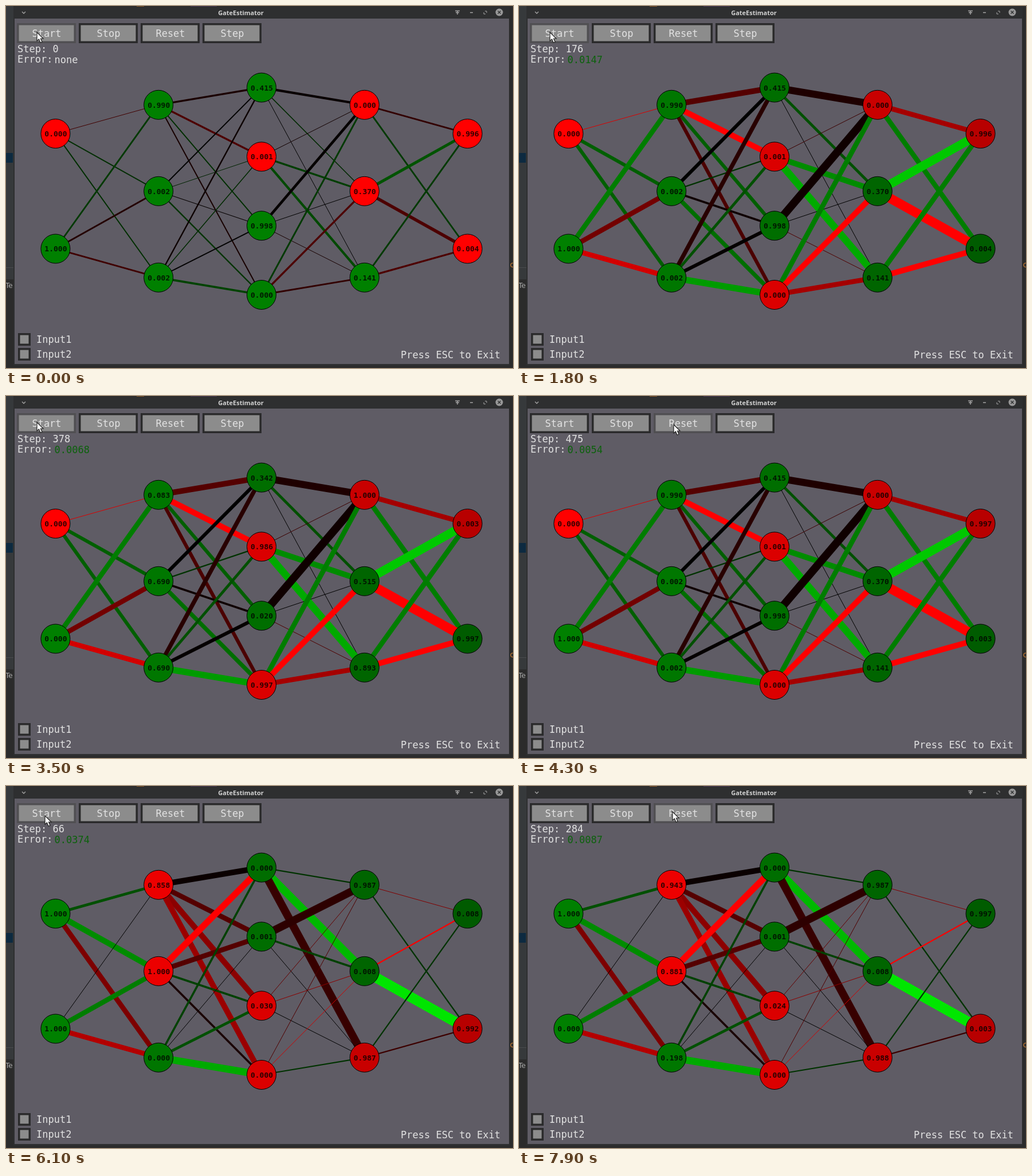
Recreate the animation shown at these times as an HTML page with a canvas. Size 885 by 633 pixels, loop 8000 ms.

```html
<!DOCTYPE html>
<html lang="en">
<head>
<meta charset="utf-8">
<title>GateEstimator</title>
<style>
html, body { margin: 0; width: 100%; height: 100%; overflow: hidden; background: #2b2b2b; }
canvas { display: block; }
</style>
</head>
<body>
<canvas id="stage" width="885" height="633"></canvas>
<script>
const ctx = document.getElementById('stage').getContext('2d');
const LOOP = 8000;
const MONO = '"DejaVu Sans Mono", monospace';
const WHITE = '#e2e2e2', FRAME = '#2a2a2b', FACE = '#8c8c8c', ICON = '#a6a6a6';
const THIN = [1, 0];

// Trained weights, one row per source node. A plain number is a positive weight;
// a pair is a negative weight with its redness. Everything else follows from these.
const runs = [
  {
    errorSum: 2.5786,
    redAtStart: [0, 6, 9, 10, 12, 13],
    redAtEnd: [0, 6, 8, 9, 12],
    weights: [
      [[[1, 220], 5, 5], [7, [7, 115], [7, 210]]],
      [[[8, 85], [8, 255], 5, [5, 75]], [[5, 0], 2, [3, 15], 6], [[6, 40], 4, [5, 5], 9]],
      [[[10, 30], 4, THIN], [[1, 60], 8, 10], [[11, 15], THIN, [1, 80]], [7, [8, 255], [7, 165]]],
      [[[7, 165], 7], [12, [13, 255]], [7, [8, 255]]]
    ]
  },
  {
    errorSum: 2.47,
    redAtStart: [4, 5, 6, 7, 8, 12, 13],
    redAtEnd: [2, 3, 7, 8, 11, 13],
    weights: [
      [[4, 8, [7, 125]], [THIN, 7, [7, 180]]],
      [[[8, 10], [7, 85], [8, 140], [8, 155]], [[9, 255], [7, 85], 3, [3, 25]], [3, THIN, 4, 10]],
      [[2, 11, [11, 55]], [[11, 45], 3, THIN], [[1, 100], [1, 140], THIN], [[1, 80], [1, 210], 2]],
      [[[1, 130], 2], [[2, 250], 14], [2, [2, 60]]]
    ]
  }
];

// The screen refreshes every 100 ms inside these spans and holds between them.
const refreshes = [[500, 2400], [3500, 3900], [4300, 4300], [4500, 4500], [5300, 5300],
  [5500, 5600], [5800, 5900], [6100, 6400], [6600, 6700], [6900, 7100], [7400, 7700], [7900, 7900]];
const stepKeys = [[305, 0], [1000, 82], [1800, 176], [3500, 378], [4300, 475],
  [4499, 475], [4500, 0], [5550, 0], [6100, 66], [7900, 284]];
const cursorKeys = [[3500, 54, 46], [3900, 190, 50], [4300, 270, 50], [5200, 270, 50],
  [5300, 74, 56], [5600, 68, 52], [6100, 68, 52], [6700, 262, 48], [7700, 268, 45]];
const sampleOrder = [0, 1, 3, 3, 2, 2, 1];

const layers = [2, 3, 4, 3, 2].map((size, depth) => Array.from({ length: size },
  (_, i) => ({ x: 446 + (depth - 2) * 179.8, y: 21.8 + 604 * (i + 1) / (size + 1), depth })));

const lerp = (a, b, p) => a + (b - a) * p;
const sigmoid = v => 1 / (1 + Math.exp(-v));
const signedWeight = w => Array.isArray(w) ? -w[0] : w;

function track(keys, t) {
  const next = keys.findIndex(key => key[0] > t);
  if (next === 0) return keys[0].slice(1);
  if (next < 0) return keys[keys.length - 1].slice(1);
  const a = keys[next - 1], b = keys[next];
  const p = (t - a[0]) / (b[0] - a[0]);
  return a.slice(1).map((v, i) => lerp(v, b[i + 1], p));
}

function refreshTime(t) {
  const tick = Math.floor(t / 100) * 100;
  let shown = 0;
  for (const [start, end] of refreshes) if (tick >= start) shown = Math.min(tick, end);
  return shown;
}

// Feeds one input pair through the network; the outputs are XOR and its inverse.
function activations(run, step) {
  const sample = step ? sampleOrder[step % 7] : 1;
  const inputs = [sample >> 1, sample & 1];
  const result = [inputs];
  run.weights.slice(0, -1).forEach((rows, depth) => {
    const source = result[depth];
    result.push(rows[0].map((_, j) =>
      sigmoid(rows.reduce((sum, row, i) => sum + signedWeight(row[j]) * (source[i] - .4), 0))));
  });
  const miss = step ? Math.min(.1, .4 / step) + .002 : .004;
  const xor = inputs[0] ^ inputs[1];
  result.push([Math.abs(xor - miss), Math.abs(1 - xor - miss)]);
  return result.flat();
}

function shadeColor(shade) {
  const level = Math.min(255, Math.round(Math.abs(shade)));
  return shade < 0 ? `rgb(${level},0,0)` : `rgb(0,${level},0)`;
}

function rect(x, y, w, h, color) {
  ctx.fillStyle = color;
  ctx.fillRect(x, y, w, h);
}

function box(x, y, w, h, border = FRAME) {
  rect(x, y, w, h, border);
  rect(x + 3.5, y + 3.5, w - 7, h - 7, FACE);
}

function text(str, x, y, color = WHITE, font = `17px ${MONO}`, align = 'left') {
  ctx.font = font;
  ctx.fillStyle = color;
  ctx.textAlign = align;
  ctx.fillText(str, x, y);
}

function line(points, width, color) {
  ctx.beginPath();
  points.forEach(([x, y]) => ctx.lineTo(x, y));
  ctx.lineWidth = width;
  ctx.strokeStyle = color;
  ctx.stroke();
}

function disc(x, y, r, color) {
  ctx.beginPath();
  ctx.arc(x, y, r, 0, Math.PI * 2);
  ctx.fillStyle = color;
  ctx.fill();
}

function drawDesktop() {
  rect(0, 0, 885, 633, '#2b2b2b');
  rect(0, 0, 13, 478, '#36393b');
  rect(0, 257, 12, 17, '#0d2a40');
  rect(0, 457, 13, 1, '#4a4c4e');
  text('Te', -1, 493, '#aaa', '12px "DejaVu Sans", sans-serif');
  text('c', 879, 457, '#c07832', `14px ${MONO}`);
  rect(228, 0, 13, 1, '#8a5a2c');
  rect(322, 0, 46, 1, '#4a3a56');
}

function drawWindow() {
  rect(13, 2, 866, 627, '#2e2f30');
  rect(15, 22, 863, 604, '#5f5c65');
  text('GateEstimator', 410, 16, '#d2d2d2', 'bold 11px "Noto Sans", "Open Sans", sans-serif', 'center');
  line([[28, 10], [31, 13], [34, 10]], 1.3, ICON);
  line([[784, 8.5], [792, 8.5]], 1.5, ICON);
  line([[785, 11.5], [791, 11.5]], 1.5, ICON);
  line([[788, 8], [788, 15]], 1.5, ICON);
  line([[810, 11.5], [815, 11.5]], 1.5, ICON);
  line([[836, 9], [839, 9], [839, 12]], 1, ICON);
  line([[834, 11], [834, 14], [837, 14]], 1, ICON);
  disc(861, 11, 6.5, '#989898');
  line([[858.5, 8.5], [863.5, 13.5]], 1.3, '#2e2f30');
  line([[863.5, 8.5], [858.5, 13.5]], 1.3, '#2e2f30');
}

function drawControls([cursorX, cursorY]) {
  ['Start', 'Stop', 'Reset', 'Step'].forEach((label, i) => {
    const x = 19 + i * 108;
    const hover = cursorX >= x && cursorX < x + 103 && cursorY >= 30 && cursorY < 65;
    box(x, 30, 103, 35, hover ? '#504f52' : FRAME);
    text(label, x + 52, 54, WHITE, undefined, 'center');
  });
  ['Input1', 'Input2'].forEach((label, i) => {
    const y = 572 + i * 26;
    box(21, y, 22, 22);
    text(label, 53, y + 16.5);
  });
  text('Press ESC to Exit', 689, 616);
}

function drawStatus(run, step) {
  text('Step: ' + step, 20, 81);
  text('Error:', 20, 99);
  if (!step) return text('none', 84.5, 100);
  const error = run.errorSum / step * (1 - Math.exp(-step / 10));
  text(error.toFixed(4), 84.5, 100, '#0c620c');
}

function drawEdge(from, to, weight, learned) {
  const strength = Math.max(1, Math.abs(signedWeight(weight)) * lerp(.35, 1, learned));
  const shade = Array.isArray(weight) ? -weight[1] * lerp(.3, 1, learned) : 20 + 15 * strength;
  line([[from.x, from.y], [to.x, to.y]], 1 + 1.28 * (strength - 1), shadeColor(shade));
}

function drawNetwork(run, step) {
  const learned = 1 - Math.exp(-step / 12);
  run.weights.forEach((rows, depth) => rows.forEach((row, i) => row.forEach((weight, j) =>
    drawEdge(layers[depth][i], layers[depth + 1][j], weight, learned))));

  const values = activations(run, step);
  layers.flat().forEach(({ x, y, depth }, i) => {
    const startShade = run.redAtStart.includes(i) ? -255 : 128;
    const endShade = (run.redAtEnd.includes(i) ? -255 : 128) * (1 - .07 * depth);
    disc(x, y, 25.5, shadeColor(lerp(startShade, endShade, learned)));
    ctx.lineWidth = 1;
    ctx.strokeStyle = '#000';
    ctx.stroke();
    text(values[i].toFixed(3), x + .5, y + 5, 'rgba(0,0,0,.8)', `bold 13px ${MONO}`, 'center');
  });
}

function drawCursor([x, y]) {
  ctx.save();
  ctx.translate(x, y);
  ctx.beginPath();
  [[0, 0], [0, 15], [3.5, 12], [6, 18], [9, 17], [6.5, 11], [11, 11]].forEach(p => ctx.lineTo(...p));
  ctx.closePath();
  ctx.lineWidth = 1.2;
  ctx.strokeStyle = '#222';
  ctx.fillStyle = '#fff';
  ctx.fill();
  ctx.stroke();
  ctx.restore();
}

function draw(now) {
  const t = refreshTime(now % LOOP);
  const run = runs[t < 4500 ? 0 : 1];
  const step = Math.round(track(stepKeys, t)[0]);
  const cursor = track(cursorKeys, t);
  drawDesktop();
  drawWindow();
  drawControls(cursor);
  drawStatus(run, step);
  drawNetwork(run, step);
  drawCursor(cursor);
}

const startTime = performance.now();
function loop() {
  draw(performance.now() - startTime);
  requestAnimationFrame(loop);
}
loop();
</script>
</body>
</html>
```
